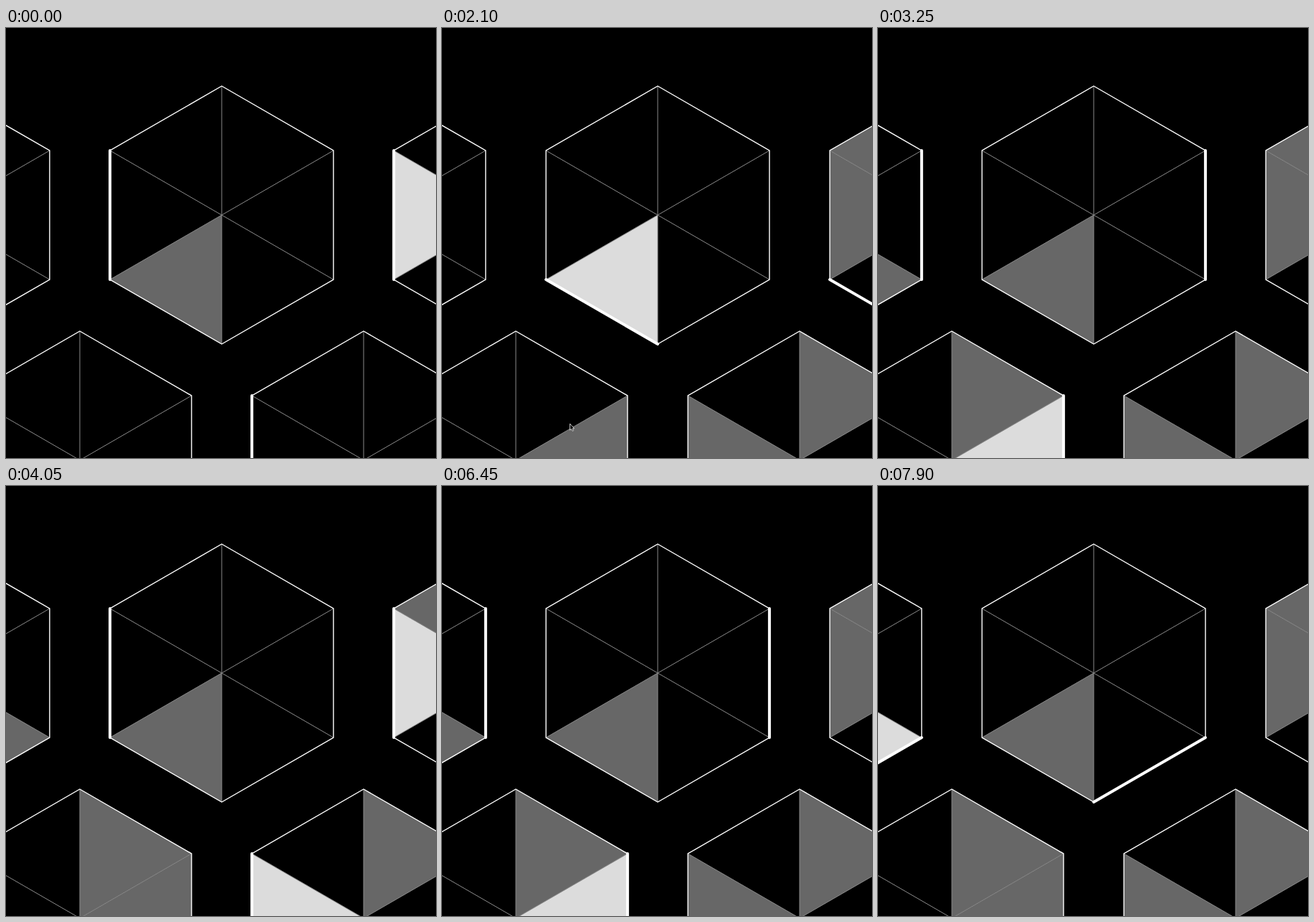
Write an HTML page that moves like this. It is 600 px wide and 600 px high and loops after 8000 ms.

```html
<!DOCTYPE html>
<html lang="en">
<head>
<meta charset="utf-8">
<title>Hexagon sequencer</title>
<style>
  html, body { margin: 0; width: 100%; height: 100%; overflow: hidden; background: #000; }
  svg { display: block; width: 100vw; height: 100vh; }
  .spoke { stroke: #8a8a8a; stroke-width: 1; fill: none; }
  .rim { stroke: #fff; stroke-width: 1.4; fill: none; }
  .bar { stroke: #fff; stroke-width: 4; stroke-linecap: round; }
</style>
</head>
<body>
<svg id="stage" viewBox="0 0 600 600"></svg>
<script>
const LOOP = 8000, R = 180;
const NE = 0, E = 1, SE = 2, SW = 3, W = 4, NW = 5;
const IDLE = '#676767', LIT = '#dcdcdc';

// Active side of every hexagon: [start time, side]
const STEPS = [
  [0, W], [250, NW], [700, NE], [1150, E], [1500, SE], [2000, SW], [2300, W],
  [2600, NW], [2900, NE], [3200, E], [3450, SE], [3750, SW], [4050, W],
  [4350, NW], [4650, NE], [4900, E], [5200, SE], [5500, SW], [5800, W],
  // playback turns around here
  [5900, SW], [6100, SE], [6450, E], [6750, NE], [7050, NW], [7300, W],
  [7600, SW], [7900, SE]
];

// Cells that are switched on: side -> time
const HEXES = [
  { x: -95, y: 261, on: { [SE]: 2850 } },
  { x: 301, y: 261, on: { [SW]: 0 } },
  { x: 697, y: 261, on: { [W]: 0, [NW]: 600 } },
  { x: 103, y: 603, on: { [E]: 2000, [NE]: 2250 } },
  { x: 499, y: 603, on: { [NE]: 1100, [W]: 1650 } }
];

// Pointer path: [time, x, y]
const PATH = [
  [1950, 190, 575], [2050, 190, 570], [2250, 145, 500],
  [2450, 70, 425], [2650, 37, 400], [2850, 24, 352]
];

const svg = document.getElementById('stage');

function add(tag, attrs) {
  const node = document.createElementNS('http://www.w3.org/2000/svg', tag);
  for (const key in attrs) node.setAttribute(key, attrs[key]);
  svg.appendChild(node);
  return node;
}

function corner(hex, i) {
  const a = (i * 60 - 90) * Math.PI / 180;
  return [hex.x + R * Math.cos(a), hex.y + R * Math.sin(a)];
}

for (const hex of HEXES) {
  const pts = [0, 1, 2, 3, 4, 5].map(i => corner(hex, i));
  const mid = [hex.x, hex.y];
  hex.pts = pts;
  hex.cells = Object.keys(hex.on).map(key => {
    const side = +key;
    const tri = [mid, pts[side], pts[(side + 1) % 6]];
    return { side, from: hex.on[key], node: add('polygon', { points: tri.join(' ') }) };
  });
  add('path', { class: 'spoke', d: pts.map(p => `M${mid}L${p}`).join('') });
  add('polygon', { class: 'rim', points: pts.join(' ') });
  hex.bar = add('line', { class: 'bar' });
}

const pointer = add('path', {
  d: 'M0 0V9L2 7.2L3.5 10.2L5 9.5L3.6 6.6H6Z',
  fill: '#000', stroke: '#ddd', 'stroke-width': 0.9
});

function sideAt(t) {
  let side = W;
  for (const [from, next] of STEPS) if (t >= from) side = next;
  return side;
}

function pointerAt(t) {
  for (let i = 1; i < PATH.length; i++) {
    const [t0, x0, y0] = PATH[i - 1], [t1, x1, y1] = PATH[i];
    if (t >= t0 && t < t1) {
      const k = (t - t0) / (t1 - t0);
      return [x0 + (x1 - x0) * k, y0 + (y1 - y0) * k];
    }
  }
  return null;
}

function draw(t) {
  const side = sideAt(t);
  for (const hex of HEXES) {
    for (const cell of hex.cells) {
      const fill = t < cell.from ? 'none' : cell.side === side ? LIT : IDLE;
      cell.node.setAttribute('fill', fill);
    }
    const [x1, y1] = hex.pts[side], [x2, y2] = hex.pts[(side + 1) % 6];
    const ends = { x1, y1, x2, y2 };
    for (const key in ends) hex.bar.setAttribute(key, ends[key]);
  }
  const pos = pointerAt(t);
  pointer.setAttribute('visibility', pos ? 'visible' : 'hidden');
  if (pos) pointer.setAttribute('transform', `translate(${pos})`);
}

const start = performance.now();
function tick() {
  draw((performance.now() - start) % LOOP);
  requestAnimationFrame(tick);
}
draw(0);
requestAnimationFrame(tick);
</script>
</body>
</html>
```
